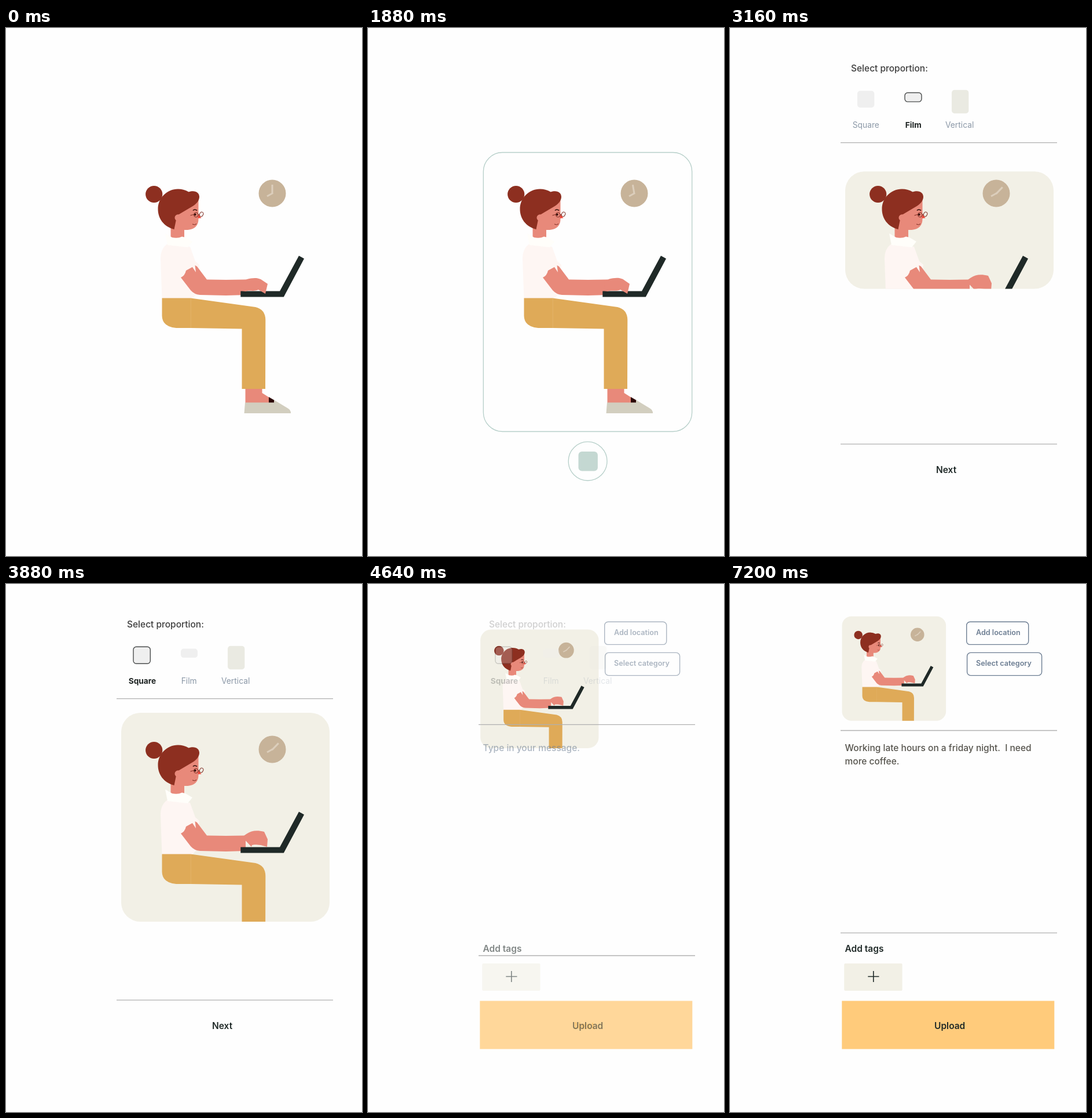
Recreate the animation shown at these times as an HTML page. Size 615 by 910 pixels, loop 7240 ms.

```html
<!DOCTYPE html>
<html lang="en">
<head>
<meta charset="utf-8">
<title>Post a picture</title>
<style>
  html, body { margin: 0; width: 100%; height: 100%; overflow: hidden; background: #fefefe; }
  svg { display: block; width: 615px; height: 910px; }
  text { font-family: Inter, sans-serif; font-size: 15.5px; font-weight: 500; white-space: pre; }
  .label { font-size: 13.8px; font-weight: 400; fill: #8b98a7; }
  .picked { font-size: 13.7px; font-weight: 700; fill: #1d2322; }
  .strong { font-weight: 600; fill: #1f2927; }
  .small { font-size: 12.6px; font-weight: 600; fill: #6c7d92; }
  .rule { stroke: #b0b0b0; stroke-width: 1.3; }
  .thin { fill: none; stroke: #b6cfc9; stroke-width: 1.3; }
  .box { fill: none; stroke: #6c7d92; stroke-width: 1.4; }
  .skin { fill: #e8897a; }
  .hair { fill: #8d2f20; }
  .dark { fill: #1f2927; }
</style>
</head>
<body>
<svg viewBox="0 0 615 910">
  <defs>
    <clipPath id="clip"><rect id="clipRect" x="199" width="360" rx="33"/></clipPath>
  </defs>

  <g id="card"><g clip-path="url(#clip)">
    <rect id="backdrop" x="199" y="214" width="360" height="482" fill="#f2f0e6"/>

    <circle cx="460" cy="285" r="23.5" fill="#c7b399"/>
    <g fill="none" stroke="#dccebc" stroke-width="3">
      <path d="M461 284.5L451 290"/>
      <path id="minute" d="M460 286V270"/>
    </g>

    <path class="skin" d="M284.5 335H308V362H284.5Z"/>
    <g id="head">
      <circle class="hair" cx="255.7" cy="286.5" r="14.6"/>
      <path class="skin" d="M290 300L332.5 291V330Q332 346 314 348H289Z"/>
      <path class="hair" d="M290.5 347C272 342 262.5 328 262.5 312C262.5 293 278 277.5 297 277.5Q307 277.5 315.5 282.5C326 279 334 283 334 291C334 298 328 304 321 308L299 321Q296 322 294 330Z"/>
      <circle class="skin" cx="297.2" cy="327" r="5.7"/>
      <path fill="#ee4b3e" d="M332.5 321L337.5 327.5L331.5 328Z"/>
      <circle cx="326.6" cy="321.6" r="2" fill="#3a1512"/>
      <g fill="none" stroke="#7c2c22" stroke-width="1">
        <path d="M318.5 323L324 321.5M332 322L334.5 321"/>
        <ellipse cx="328.3" cy="322" rx="3.8" ry="4"/>
        <ellipse cx="337.6" cy="321" rx="3" ry="4" transform="rotate(25 337.6 321)"/>
        <path d="M322 338Q326 340.5 329 337.5"/>
      </g>
      <path d="M323 314.5Q326 311.5 330 314.5" fill="none" stroke="#2b0c0a" stroke-width="1.6"/>
    </g>

    <path fill="#fef6f3" d="M279 372Q267 380 267 398L269.5 467H321L329 459L334 408L327 402L318 377Z"/>
    <path fill="#fffefa" d="M275 354L287 361Q297 363 304 359.5L310 361L322 368L314 378L279 374Z"/>
    <path class="skin" d="M302 430Q309 427 311 418L322 412L328 421L326.5 409L330 411L347 433.5L380 434L414 433.5V460L380 461L335 460Q325 459 319 452Z"/>

    <path fill="#dfaa58" d="M269.5 465.5H319L431 481Q448 485 448.3 503L448 622H407.5V518.5L319 517H294Q270 515 269.5 496Z"/>
    <path d="M319.3 466V517" stroke="#e3b36a"/>
    <path class="skin" d="M413.5 622H442.5V629L455 637V646H413.5Z"/>
    <path fill="#2b0807" d="M454 636L463.5 641.5V646H454Z"/>
    <path fill="#d2cebf" d="M413 645.5H463V641L487 655.5Q492.5 659 492 664H411.5Z"/>

    <path class="dark" d="M405.3 453.5H473L506 392.5L515 397.5L479.8 463.5H405.3Z"/>
    <path id="hand" class="skin"/>
  </g></g>

  <g id="recorder">
    <rect class="thin" x="199.3" y="214.5" width="360.4" height="481" rx="33"/>
    <circle class="thin" cx="379.6" cy="746.6" r="33.4"/>
  </g>
  <rect id="stop" fill="#c4d8d2"/>

  <rect id="bar" x="193.3" y="718.5" width="367" height="83" fill="#ffcb7b"/>
  <g id="picker">
    <text x="209" y="74.5" font-size="15.6" fill="#3d3d3d">Select proportion:</text>
  </g>
  <text id="next" class="strong" x="356" y="767">Next</text>
  <path id="rule1" class="rule" d="M191 0H565"/>
  <path id="rule2" class="rule" d="M191 0H565"/>

  <g id="form">
    <rect class="box" x="408.7" y="65.2" width="107" height="39.2" rx="6"/>
    <rect class="box" x="409.6" y="118.4" width="129" height="39.2" rx="6"/>
    <text class="small" x="425" y="88">Add location</text>
    <text class="small" x="425" y="141">Select category</text>
    <text id="hint" x="198.5" y="288" fill="#6c7d92">Type in your message.</text>
    <text class="strong" x="198.5" y="634.3">Add tags</text>
    <rect x="197.2" y="654" width="100.4" height="47" rx="2" fill="#f2f0e6"/>
    <path d="M238.3 676.5H257.5M247.8 667V686" stroke="#1f2927" stroke-width="1.6"/>
    <text class="strong" x="353" y="767">Upload</text>
  </g>
  <text id="line1" x="198.5" y="288" fill="#55534c"></text>
  <text id="line2" x="198.5" y="311.3" fill="#55534c"></text>
  <path id="caret" d="M0 0V16" stroke="#ffc66d" stroke-width="1.5"/>
</svg>

<script>
const LOOP = 7240;
const NS = 'http://www.w3.org/2000/svg';
const el = {};
document.querySelectorAll('[id]').forEach(n => el[n.id] = n);

const clamp = u => Math.max(0, Math.min(1, u));
const ramp = (t, a, b) => clamp((t - a) / (b - a));
const ease = u => (1 - Math.cos(Math.PI * u)) / 2;
const mix = (a, b, u) => a + (b - a) * u;
const set = (node, attrs) => {
  for (const k in attrs) node.setAttribute(k, attrs[k]);
  return node;
};
const add = (tag, attrs, text = '') => {
  const node = set(document.createElementNS(NS, tag), attrs);
  node.textContent = text;
  return el.picker.appendChild(node);
};

// name, label x, icon x, y, width, height, fill
const options = [
  ['Square', 211.7, 220, 108.2, 29.3, 29, '#efefef'],
  ['Film', 302.7, 302, 111.5, 29, 15.6, '#efefef'],
  ['Vertical', 372, 383, 106.8, 29.3, 40.4, '#eaeae2']
].map(([name, tx, x, y, width, height, fill]) => {
  const icon = { x, y, width, height, rx: 5 };
  add('rect', { ...icon, fill });
  return {
    edge: add('rect', { ...icon, fill: 'none', stroke: '#4a4d4d', 'stroke-width': 1.4 }),
    plain: add('text', { x: tx, y: 171.7, class: 'label' }, name),
    bold: add('text', { x: tx, y: 171.7, class: 'picked' }, name)
  };
});

// hand outline, resting on the keys and lifted
const handDown = [408, 436, 414, 433, 430, 428, 440, 433, 452, 441, 448, 458, 436, 451, 428, 455, 420, 451, 414, 454, 408, 453];
const handUp = [408, 436, 414, 433, 422, 421, 446, 427, 452, 440, 451, 453, 440, 450, 432, 449, 428, 449, 425, 450, 424, 453];

function handPath(u) {
  const p = handDown.map((v, i) => mix(v, handUp[i], u).toFixed(2));
  return `M${p.slice(0, 2)}C${p.slice(2, 8)}L${p.slice(8, 14)}C${p.slice(14, 20)}L${p.slice(20)}Z`;
}

function drawScene(t) {
  const lift = (1 - Math.cos(2 * Math.PI * Math.min(t, 2020) / 311)) / 2;
  el.hand.setAttribute('d', handPath(t < 2020 ? lift : 1));
  el.minute.setAttribute('transform', `rotate(${764 * ramp(t, 40, 2020)} 460 285.5)`);
  el.head.setAttribute('transform', `rotate(${-3.8 * Math.sin(Math.PI * ramp(t, 800, 1440))} 296 350)`);
}

function drawRecorder(t) {
  const out = 1 - ramp(t, 2080, 2280);
  const u = ease(ramp(t, 280, 720));
  const size = mix(51, 33.4, u);
  el.recorder.setAttribute('opacity', ramp(t, 20, 760) * out);
  set(el.stop, {
    x: 380.2 - size / 2, y: 746.8 - size / 2, width: size, height: size,
    rx: mix(25.5, 6, u), opacity: ramp(t, 20, 160) * out
  });
}

function drawCard(t, film, square) {
  const p = ease(ramp(t, 4392, 4720));
  el.backdrop.setAttribute('opacity', ramp(t, 2080, 2280));
  set(el.clipRect, {
    y: mix(mix(214.5, 247.3, film), 222, square),
    height: mix(mix(481, 202.3, film), 360, square)
  });
  el.card.setAttribute('transform',
    `translate(${199 - 5.7 * p} ${222 - 166.3 * p}) scale(${1 - p / 2}) translate(-199 -222)`);
}

function drawPicker(t, film, square) {
  const show = ramp(t, 2080, 2280);
  const fade = ramp(t, 4392, 4720);
  const picked = [square, film * (1 - square), 1 - film];
  options.forEach((o, i) => {
    o.edge.setAttribute('opacity', picked[i]);
    o.bold.setAttribute('opacity', picked[i]);
    o.plain.setAttribute('opacity', 1 - picked[i]);
  });
  el.picker.setAttribute('opacity', show * (1 - fade));
  el.bar.setAttribute('opacity', fade);
  el.next.setAttribute('opacity', t < 4720 ? show : 0);
  el.next.style.fill = t < 4360 ? '' : '#ffcb7b';
  set(el.rule1, { opacity: show, transform: `translate(0 ${mix(197.7, 252.5, ease(ramp(t, 4440, 4720)))})` });
  set(el.rule2, { opacity: show, transform: `translate(0 ${mix(717.2, 601.3, ease(ramp(t, 4520, 4720)))})` });
}

const lines = ['Working late hours on a friday night.  I need', 'more coffee.'];
const TYPE_START = 5500, PER_CHAR = 16.8;
const TYPE_END = TYPE_START + PER_CHAR * (lines[0].length + lines[1].length);

function drawForm(t) {
  const count = Math.max(0, Math.floor((t - TYPE_START) / PER_CHAR));
  const rest = Math.max(0, count - lines[0].length);
  el.form.setAttribute('opacity', ramp(t, 4540, 4720));
  el.hint.setAttribute('opacity', count ? 0 : 1);
  el.line1.textContent = lines[0].slice(0, count);
  el.line2.textContent = lines[1].slice(0, rest);

  const line = rest ? el.line2 : el.line1;
  const x = 198.3 + (count ? line.getComputedTextLength() : 0);
  const blink = t < TYPE_END ? 1 : (1 + Math.cos(2 * Math.PI * (t - TYPE_END) / 495)) / 2;
  set(el.caret, {
    opacity: t < 5440 ? 0 : blink,
    transform: `translate(${x} ${rest ? 297 : 272.5})`
  });
}

function render(t) {
  const film = ease(ramp(t, 2960, 3160));
  const square = ease(ramp(t, 3680, 3880));
  drawScene(t);
  drawRecorder(t);
  drawCard(t, film, square);
  drawPicker(t, film, square);
  drawForm(t);
}

const start = performance.now();
function tick() {
  render((performance.now() - start) % LOOP);
  requestAnimationFrame(tick);
}
tick();
</script>
</body>
</html>
```
